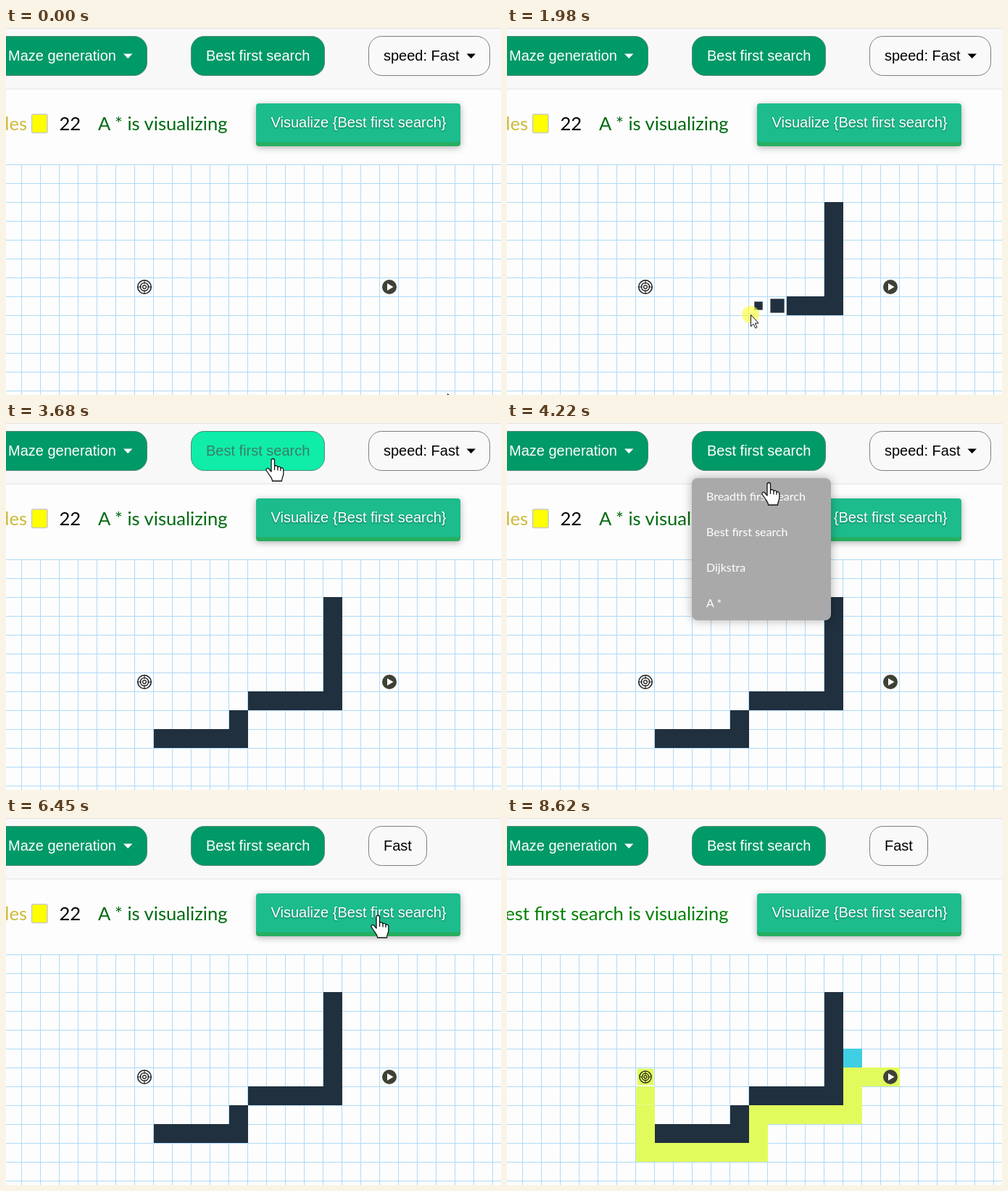
An HTML page for the animation above (8850 ms loop, 683x506 px).

```html
<!DOCTYPE html>
<html lang="en">
<head>
<meta charset="utf-8">
<title>Path finding</title>
<style>
  html, body { margin: 0; width: 100%; height: 100%; overflow: hidden; background: #fdfdfd; }
  svg { display: block; width: 100vw; height: 100vh; }
  text { font: 20px "Liberation Sans", Arial, sans-serif; white-space: pre; }
  .info text { font: 25.6px Lato, sans-serif; }
  .menu text { font: 16px Lato, sans-serif; fill: #fff; }
  .menu { filter: drop-shadow(0 0 7px rgba(0, 0, 0, .3)); }
  .green rect { fill: #009968; stroke: #4f8a72; }
  .green text, .green path { fill: #fff; }
  .green.hover rect { fill: #0feda9; }
  .green.hover text { fill: #3d7d66; }
  .plain rect { fill: #f9f9f9; stroke: #7d7d7d; }
  .plain.hover rect { stroke: #009968; }
  .plain.hover text, .plain.hover path { fill: #009968; }
  .run { filter: drop-shadow(0 2px 5px rgba(0, 0, 0, .3)); }
  .run text { fill: #fff; filter: drop-shadow(0 1px 1px rgba(0, 0, 0, .4)); }
</style>
</head>
<body>
<svg viewBox="0 0 683 506">
  <defs>
    <pattern id="grid" patternUnits="userSpaceOnUse" x="21" y="188" width="26" height="26">
      <path d="M.5 0V26M0 .5H26" stroke="#aedaf7" shape-rendering="crispEdges"/>
    </pattern>
  </defs>
  <rect width="683" height="506" fill="#fdfdfd"/>
  <rect y="188" width="683" height="318" fill="url(#grid)"/>
  <g id="cells"></g>
  <g id="goal" fill="none" stroke="#1c1c1c">
    <circle r="9.3" stroke-width="1.5"/>
    <circle r="5.6" stroke-width="1.3"/>
    <circle r="2.4" stroke-width="1.3"/>
    <path d="M-9 0H-4M4 0H9M0 -9V-4M0 4V9"/>
  </g>
  <g id="start">
    <circle r="10" fill="#3f4136"/>
    <path d="M-3 -5L5.5 0L-3 5Z" fill="#fff"/>
  </g>

  <rect width="683" height="84" fill="#f8f8f8"/>
  <path d="M0 .5H683M0 84H683" stroke="#e2e2e2"/>
  <g class="green">
    <rect x="-40" y="11.5" width="234.5" height="54" rx="18"/>
    <text x="3" y="45">Maze generation</text>
    <path d="M162 35.5H174.500L168.200 42Z"/>
  </g>
  <g class="green" id="algo">
    <rect x="255.500" y="11.5" width="184" height="54" rx="18"/>
    <text x="276" y="45">Best first search</text>
  </g>
  <g class="plain" id="speed">
    <rect x="500.500" y="11.5" width="167" height="54" rx="18"/>
    <text x="521" y="45">speed: Fast</text>
    <path d="M635.500 35.500H648L641.700 42Z"/>
  </g>

  <g class="info" id="before">
    <text x="29" y="141" text-anchor="end" fill="#cdb93a">nodes</text>
    <rect x="35.500" y="119" width="21.500" height="25.500" rx="2" fill="#ff0" stroke="#c9c9c9" stroke-width="1.500"/>
    <text x="73.500" y="141">22</text>
    <text x="305.500" y="141" text-anchor="end" fill="#006a10">A * is visualizing</text>
  </g>
  <g class="info" id="after">
    <text x="305.500" y="141" text-anchor="end" fill="#008000">Best first search is visualizing</text>
  </g>
  <g class="run" id="run">
    <rect x="345" y="110" width="282" height="53" rx="4" fill="#27ae60"/>
    <rect x="345" y="104" width="282" height="53.500" rx="4" fill="#1cbc8c"/>
    <text x="365.500" y="137">Visualize {Best first search}</text>
  </g>

  <g class="menu" id="algoMenu">
    <rect x="255" y="76" width="192" height="196" rx="8" fill="#a9a9a9"/>
    <text x="275" y="107">Breadth first search</text>
    <text x="275" y="156">Best first search</text>
    <text x="275" y="205">Dijkstra</text>
    <text x="275" y="254">A *</text>
  </g>
  <g class="menu" id="speedMenu">
    <rect x="500" y="76" width="192" height="98" rx="8" fill="#a9a9a9"/>
    <text x="520" y="107">Slow</text>
    <text x="520" y="156">Fast</text>
  </g>

  <g id="cursor" stroke="#111" fill="#fff" stroke-linejoin="round">
    <circle id="halo" r="12" fill="#ffff3c" fill-opacity=".65" stroke="none"/>
    <path id="arrow" d="M.5 .5V16.500L4 13L6.700 18.800L9 17.700L6.400 12H11.200Z"/>
    <g id="hand" stroke-width="1.300">
      <path d="M-2 1.500C-2 -1.500 2.500 -1.500 2.500 1.500V10C3 8 7 8.500 7 11C8 9.500 11 10 11 12.500C12 11 14.800 12 14.800 14.500V20C14.800 24 12.500 25 12.500 30H-.5C-.5 26 -4 23 -6 19.500L-9 15C-9.500 12.500 -6.500 11.500 -5 13.500L-2 17Z"/>
      <path d="M2.500 10V15M7 11V15.500M11 12.500V16" fill="none"/>
    </g>
  </g>
</svg>
<script>
const LOOP = 8850, STEP = 77;
const $ = id => document.getElementById(id);
const clamp = v => Math.max(0, Math.min(1, v));
const mix = (a, b, p) => a + (b - a) * p;
const show = (el, on) => el.style.display = on ? '' : 'none';

// [step, x, y] of the pointer tip
const track = [
  [0, 609, 504], [9, 448, 261], [11, 448, 261], [19, 449, 375], [23, 386, 375],
  [26, 336, 395], [29, 318, 430], [31, 299, 440], [35, 227, 440], [37, 227, 440],
  [47, 368, 52], [48, 368, 50], [50, 368, 50], [55, 361, 83], [60, 348, 141],
  [63, 348, 141], [68, 585, 43], [72, 585, 43], [79, 540, 144], [83, 540, 144],
  [86, 459, 117], [93, 459, 117], [98, 479, 202], [110, 612, 508], [116, 612, 508]
];

function pointer(s) {
  const i = track.findIndex(k => k[0] > s);
  const [a, b] = [track[i - 1], track[i]];
  const p = (s - a[0]) / (b[0] - a[0]);
  return [mix(a[1], b[1], p), mix(a[2], b[2], p)];
}

// Cells along a polyline of grid corners, ends included
function line(...pts) {
  const out = [pts[0]];
  for (const [c, r] of pts.slice(1)) {
    let [x, y] = out[out.length - 1];
    while (x !== c || y !== r) {
      x += Math.sign(c - x);
      y += Math.sign(r - y);
      out.push([x, y]);
    }
  }
  return out;
}
const walls = line([16, 2], [16, 7], [12, 7], [11, 8], [11, 9], [7, 9]);
const path = line([19, 6], [17, 6], [17, 8], [12, 8], [12, 10], [6, 10], [6, 6]);
const visited = path.slice(1);
visited.splice(2, 0, [17, 5]);

const place = ([c, r], k = 1) => `translate(${35 + 26 * c} ${201 + 26 * r}) scale(${k})`;
const key = c => c.join();
const pathStart = i => i ? 97.5 + .53 * i : 94.5;
const pathAt = new Map(path.map((c, i) => [key(c), pathStart(i)]));
const pop = age => mix(.2, 1, clamp(age / 4));

const shades = [[0, 32, 52, 60], [.5, 28, 97, 96], [.75, 64, 226, 183], [1, 64, 206, 227]];
function shade(p) {
  const i = p < .5 ? 0 : p < .75 ? 1 : 2;
  const a = shades[i], b = shades[i + 1];
  const q = (p - a[0]) / (b[0] - a[0]);
  return `rgb(${[1, 2, 3].map(n => Math.round(mix(a[n], b[n], q)))})`;
}

function makeCell(pos, start, kind) {
  const el = document.createElementNS('http://www.w3.org/2000/svg', 'rect');
  for (const [k, v] of Object.entries({ x: -13, y: -13, width: 26, height: 26 })) el.setAttribute(k, v);
  el.setAttribute('fill', kind === 'wall' ? '#20303f' : '#e2fb5c');
  $('cells').append(el);
  return { el, pos, start, kind };
}
const cells = [
  ...walls.map((c, i) => makeCell(c, 11.3 + 1.5 * i, 'wall')),
  ...visited.map((c, i) => makeCell(c, 90.9 + .35 * i, 'visit')),
  ...path.map((c, i) => makeCell(c, pathStart(i), 'path'))
];

function drawCell({ el, pos, start, kind }, s) {
  const age = s - start;
  const replaced = kind === 'visit' && s >= pathAt.get(key(pos));
  show(el, age >= 0 && !replaced);
  let scale = pop(age);
  if (kind === 'visit') {
    const p = clamp(age / 14);
    scale = visitScale(p);
    el.setAttribute('rx', 13 * (1 - p));
    el.setAttribute('fill', shade(p));
  }
  el.setAttribute('transform', place(pos, scale));
}
function visitScale(p) {
  if (p < .5) return mix(.27, .94, p * 2);
  return p < .75 ? mix(.94, 1.2, p * 4 - 2) : mix(1.2, 1, p * 4 - 3);
}

function drawMenu(el, s, from, to) {
  const open = s >= from && s < to;
  const p = clamp((s - from) / 4);
  show(el, open);
  el.setAttribute('opacity', p);
  el.setAttribute('transform', `translate(0 ${30 * (1 - p)})`);
  return open;
}

const inside = (x, y, l, t, r, b) => x >= l && x <= r && y >= t && y <= b;

function draw(s) {
  cells.forEach(c => drawCell(c, s));
  const startPop = s >= pathStart(0) ? pop(s - pathStart(0)) : 1;
  const goalPath = pathAt.get('6,6');
  const goalVisit = 90.9 + .35 * (visited.length - 1);
  const goalScale = s >= goalPath ? pop(s - goalPath)
    : s >= goalVisit ? visitScale(clamp((s - goalVisit) / 14)) : 1;
  $('start').setAttribute('transform', place([19, 6], startPop));
  $('goal').setAttribute('transform', place([6, 6], goalScale));

  const algoOpen = drawMenu($('algoMenu'), s, 51, 62);
  const speedOpen = drawMenu($('speedMenu'), s, 70.8, 81);

  const chosen = s >= 81;
  const [box, label, caret] = $('speed').children;
  box.setAttribute('width', chosen ? 80 : 167);
  label.textContent = chosen ? 'Fast' : 'speed: Fast';
  show(caret, !chosen);

  show($('before'), s < 90);
  show($('after'), s >= 90);
  const pressed = s === 90 || s === 91;
  $('run').children[1].setAttribute('transform', `translate(0 ${pressed ? 3 : 0})`);
  $('run').children[2].setAttribute('transform', `translate(0 ${pressed ? 3 : 0})`);

  const [x, y] = pointer(s);
  const onAlgo = inside(x, y, 255, 11, 440, 66);
  const onSpeed = inside(x, y, 500, 11, chosen ? 581 : 668, 66);
  const hand = onAlgo || onSpeed || inside(x, y, 345, 104, 627, 163)
    || algoOpen && inside(x, y, 255, 76, 447, 272)
    || speedOpen && inside(x, y, 500, 76, 692, 174);
  $('algo').classList.toggle('hover', onAlgo);
  $('speed').classList.toggle('hover', onSpeed);
  show($('hand'), hand);
  show($('arrow'), !hand);
  show($('halo'), s >= 10 && s < 36);
  $('cursor').setAttribute('transform', `translate(${x} ${y})`);
}

function tick() {
  draw(Math.floor((performance.now() % LOOP + 30) / STEP));
  requestAnimationFrame(tick);
}
tick();
</script>
</body>
</html>
```
